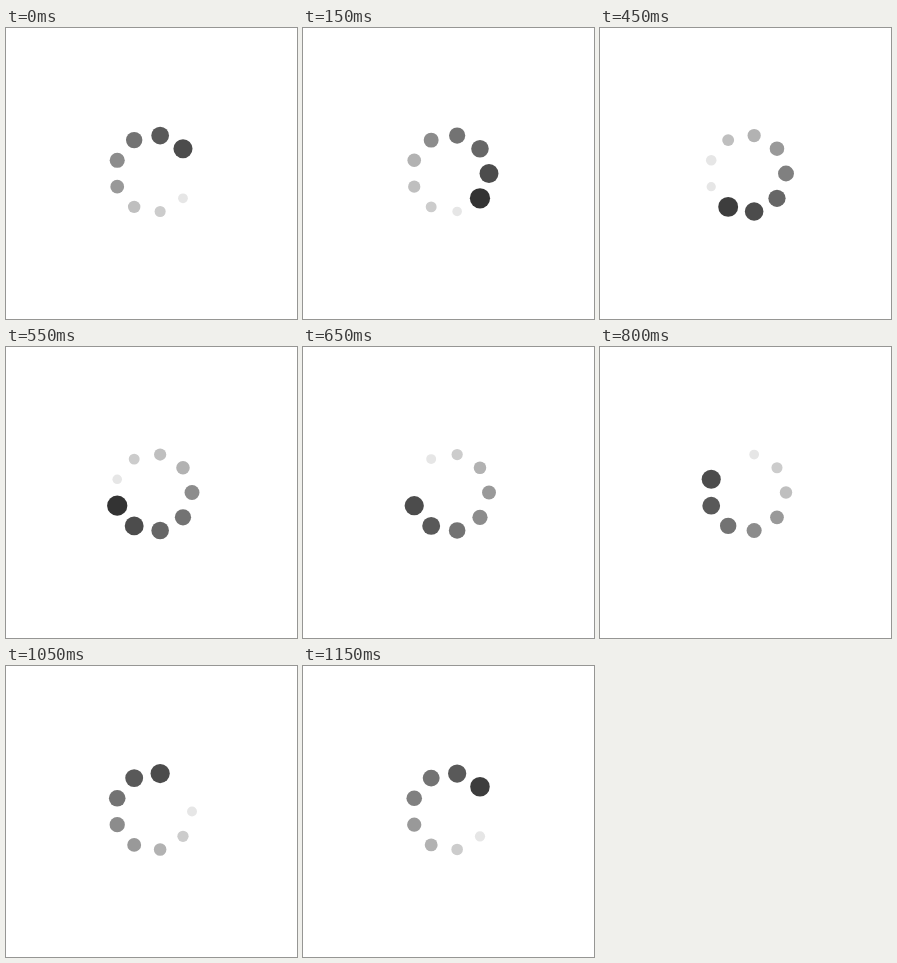
An HTML page that plays this animation: 291x291 px, repeating every 1.2 s.

```html
<!DOCTYPE html>
<html lang="en">
<head>
<meta charset="utf-8">
<title>Loading spinner</title>
<style>
  html, body { margin: 0; width: 100%; height: 100%; overflow: hidden; background: #fff; }
  svg { display: block; width: 100%; height: 100%; }
</style>
</head>
<body>
<svg id="stage" viewBox="0 0 291 291"></svg>
<script>
const LOOP = 1200, STEP = 50, COUNT = 9;
const CX = 147.45, CY = 145.5, RING = 38.55;
const GREYS = [51, 61, 76, 89, 102, 115, 128, 140, 153, 178, 191, 204, 230, 255];

const mix = (a, b, k) => a + (b - a) * k;
const nearestGrey = v =>
  GREYS.reduce((best, g) => Math.abs(g - v) < Math.abs(best - v) ? g : best);

const stage = document.getElementById("stage");
const dots = Array.from({ length: COUNT }, (_, i) => {
  const dot = document.createElementNS("http://www.w3.org/2000/svg", "circle");
  const angle = i / COUNT * 2 * Math.PI;
  dot.setAttribute("cx", CX + RING * Math.cos(angle));
  dot.setAttribute("cy", CY + RING * Math.sin(angle));
  return stage.appendChild(dot);
});

// Each dot pops in dark and large, then shrinks and fades over one loop.
function draw(ms) {
  const t = Math.floor(ms % LOOP / STEP) * STEP;
  dots.forEach((dot, i) => {
    // The half millisecond keeps a dot hidden at the exact moment it restarts.
    const age = (t - i * LOOP / COUNT - 0.5 + LOOP) % LOOP;
    const k = (age < 0 ? age + LOOP : age) / LOOP;
    const grey = nearestGrey(mix(49, 255, k));
    dot.setAttribute("r", mix(10.2, 4.2, k));
    dot.setAttribute("fill", `rgb(${grey},${grey},${grey})`);
    dot.setAttribute("visibility", grey === 255 ? "hidden" : "visible");
  });
}

function tick() {
  draw(performance.now());
  requestAnimationFrame(tick);
}
tick();
</script>
</body>
</html>
```
